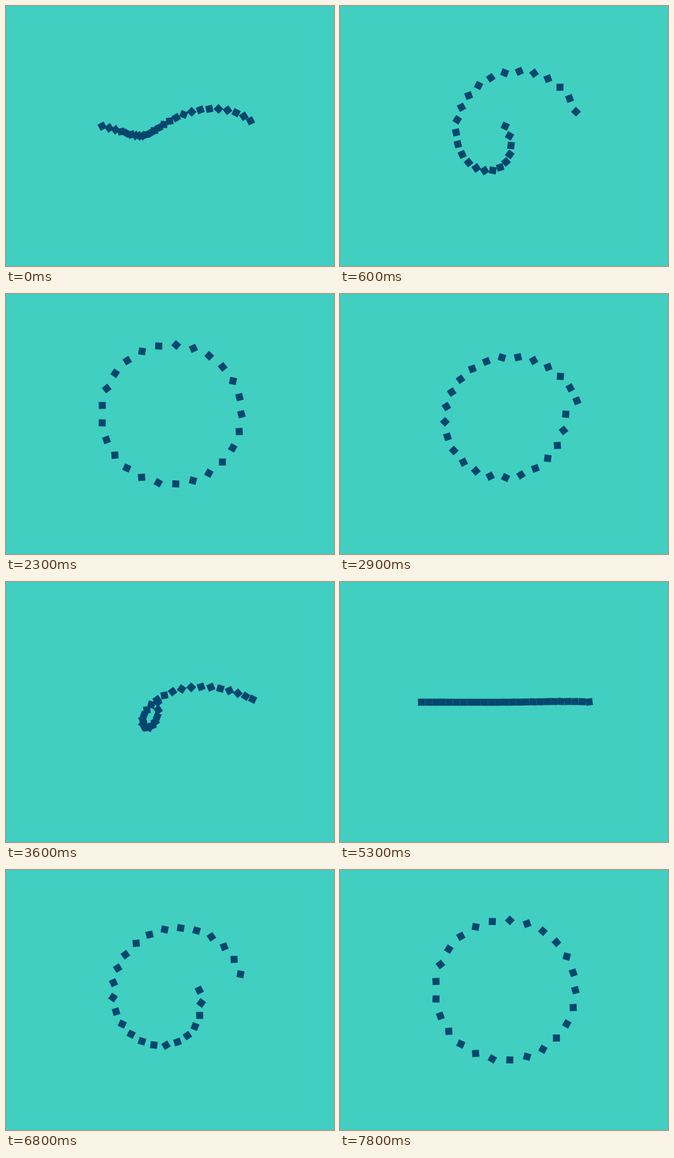
These frames come from a looping animation (600x476 px, 8.1 s). An HTML page with a canvas:

```html
<!DOCTYPE html>
<html lang="en">
<head>
<meta charset="utf-8">
<title>Line to circle</title>
<style>
  html, body { margin: 0; height: 100%; overflow: hidden; background: #40cfc1; }
  canvas { display: block; }
</style>
</head>
<body>
<canvas id="stage" width="600" height="476"></canvas>
<script>
const ctx = document.getElementById('stage').getContext('2d');

const LOOP = 8100, LAST = 7800, STEP = 100;
const HALF = 3000, MOVE = 2640, STAGGER = 15, START = -1120;
const CX = 302.6, CY = 220, RADIUS = 128, SIZE = 12.8;

// Final spin of each square, in degrees
const spins = [-285, 537, 480, -90, -512, 555, -268, -330, 356, 475, 357, -20, 362,
  -453, -38, -147, 512, 190, -88, 314, 520, -138, -222, 195, -380];
const count = spins.length;

// Pointer path: time, x, y
const pointerPath = [[900, 556, 264], [1000, 562, 266], [1900, 562, 266], [2000, 589, 270]];

const easeInOut = u => u < .5 ? 4 * u ** 3 : 1 - 4 * (1 - u) ** 3;
const mix = (a, b, p) => a + (b - a) * p;

// 0 on the line, 1 on the circle; the last square leads both ways
function progress(i, time) {
  const local = time - START - (count - 1 - i) * STAGGER + 2 * HALF;
  const half = Math.floor(local / HALF);
  const p = easeInOut(Math.min(1, (local - half * HALF) / MOVE));
  return half % 2 ? 1 - p : p;
}

function drawSquare(i, time) {
  const p = progress(i, time);
  const angle = i / count * 2 * Math.PI;
  const lineX = CX + (i - (count - 1) / 2) * SIZE;
  ctx.save();
  ctx.translate(mix(lineX, CX + RADIUS * Math.cos(angle), p), CY + RADIUS * Math.sin(angle) * p);
  ctx.rotate(spins[i] * p * Math.PI / 180);
  ctx.fillRect(-SIZE / 2, -SIZE / 2, SIZE, SIZE);
  ctx.restore();
}

function drawPointer(time) {
  const next = pointerPath.findIndex(([t]) => t > time);
  if (next < 1) return;
  const [t0, x0, y0] = pointerPath[next - 1], [t1, x1, y1] = pointerPath[next];
  const p = (time - t0) / (t1 - t0);
  ctx.save();
  ctx.translate(mix(x0, x1, p), mix(y0, y1, p));
  const arrow = new Path2D('M0 0V7L1.6 5.6L2.8 8.3L4 7.8L2.8 5.2H5Z');
  ctx.strokeStyle = '#fff';
  ctx.stroke(arrow);
  ctx.fillStyle = '#000';
  ctx.fill(arrow);
  ctx.restore();
}

function draw() {
  const elapsed = performance.now() % LOOP;
  const time = Math.min(LAST, Math.floor(elapsed / STEP) * STEP);
  ctx.fillStyle = '#40cfc1';
  ctx.fillRect(0, 0, 600, 476);
  ctx.fillStyle = '#05466e';
  for (let i = 0; i < count; i++) drawSquare(i, time);
  drawPointer(time);
  requestAnimationFrame(draw);
}
draw();
</script>
</body>
</html>
```
